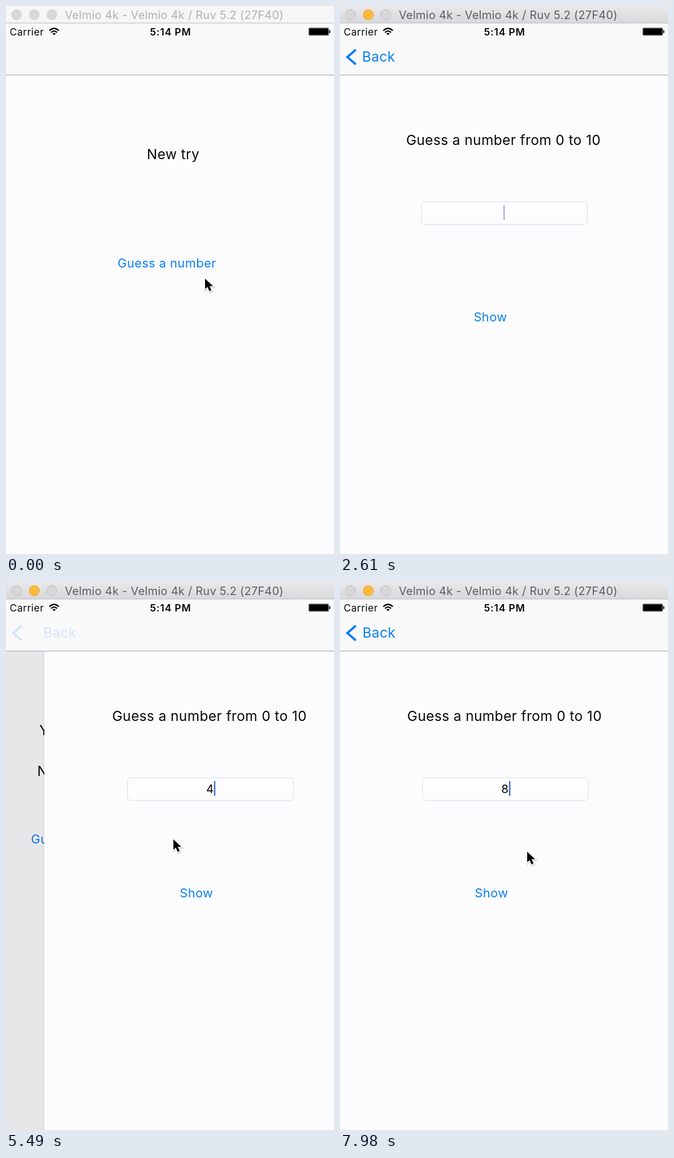
Recreate the animation shown at these times as an HTML page. Size 580x966 px, loop 8000 ms.

```html
<!DOCTYPE html>
<html lang="en">
<head>
<meta charset="utf-8">
<title>Guess a number</title>
<style>
  html, body { margin: 0; width: 100%; height: 100%; overflow: hidden; background: #fcfcfe; }
  svg { display: block; width: 580px; height: 966px; }
  text { font: 24.4px Inter, "Open Sans", sans-serif; letter-spacing: .42px; fill: #08080a; }
  .mid { text-anchor: middle; }
  .link { font-size: 21.8px; fill: #0b7ff0; }
  .status { font-size: 17.6px; }
  .clock { font-weight: 600; letter-spacing: .75px; }
  .title { font-size: 20px; letter-spacing: .25px; fill: #b2b1b4; }
  .light { fill: #d7d6d9; stroke: #d7d6d9; }
  .active .title { fill: #5e5d62; }
  .active .light { stroke: #bdbcc2; }
  .active .light.amber { fill: #fdb93a; stroke: #dfa136; }
</style>
</head>
<body>
<svg viewBox="0 0 580 966">
  <defs>
    <linearGradient id="chrome" x2="0" y2="1">
      <stop stop-color="#e9e8ea"/><stop offset="1" stop-color="#d8d7db"/>
    </linearGradient>
    <path id="arrow" d="M0 0v20l4.6-4.2 3.6 8 3.8-1.7-3.6-7.8h6.6z"/>
  </defs>
  <rect width="580" height="966" fill="#fcfcfe"/>

  <g id="home">
    <text class="mid" id="line1" x="295.5" y="270"></text>
    <text class="mid" id="line2" x="295.5" y="342"></text>
    <text class="mid link" x="284.5" y="461">Guess a number</text>
  </g>
  <rect id="dim" width="580" height="966"/>

  <g id="page">
    <rect x="-6" y="122" width="3" height="844" opacity=".03"/>
    <rect x="-3" y="122" width="590" height="844" fill="#fcfcfe"/>
    <text class="mid" x="289" y="245">Guess a number from 0 to 10</text>
    <rect x="144" y="345" width="293.5" height="40" rx="6" fill="#fdfdff" stroke="#d9d8e2"/>
    <text class="mid" id="digit" x="290" y="372" style="font-size:20.5px"></text>
    <rect id="caret" y="351" width="2.4" height="26" fill="#3f66d2"/>
    <text class="mid link" x="266" y="556">Show</text>
  </g>

  <rect y="30" width="580" height="91" fill="#f9f9fa"/>
  <rect y="121" width="580" height="1.3" fill="#b1b0ba"/>
  <g id="back">
    <path d="M28 77 13 90l15 13" fill="none" stroke="#0a7ff8" stroke-width="4"/>
    <text id="backLabel" y="98" style="fill:#0a7ff8">Back</text>
  </g>

  <text class="status" x="6.5" y="51.5">Carrier</text>
  <g fill="none" stroke="#08080a" stroke-width="2.3">
    <path d="M76.5 43.5q8.5-8 17 0M79.7 46.6q5.3-5 10.6 0"/>
    <path d="M82 48.4q3-2 6 0l-3 2.8z" fill="#08080a" stroke="none"/>
  </g>
  <text class="status clock mid" x="291" y="51.5">5:14 PM</text>
  <rect x="535.5" y="38.7" width="35" height="13" rx="2" stroke="#85858a" stroke-width="1.4"/>
  <rect x="571.4" y="42.5" width="2" height="5.5" rx="1"/>

  <g id="bar">
    <rect id="barFill" width="580" height="30"/>
    <rect y="29.4" width="580" height="1.2" fill="#bfbec9"/>
    <circle class="light" cx="18.5" cy="15.3" r="9"/>
    <circle class="light amber" cx="50" cy="15.3" r="9"/>
    <circle class="light" cx="81" cy="15.3" r="9"/>
    <text class="title" x="104" y="22.5">Velmio 4k - Velmio 4k / Ruv 5.2 (27F40)</text>
  </g>

  <g id="pointer">
    <g transform="translate(1 .5) scale(.93)">
      <use href="#arrow" x="1" y="2" fill="none" stroke="#000" stroke-width="3.5" opacity=".14"/>
      <use href="#arrow" stroke="#fff" stroke-width="2.6" paint-order="stroke" stroke-linejoin="round"/>
    </g>
  </g>
</svg>
<script>
const LOOP = 8000, SLIDE = 360, WIDTH = 580;
const $ = id => document.getElementById(id);

// [time, values...]: each row holds until the next
const slides = [[-SLIDE, 'pop'], [670, 'push'], [3600, 'pop'], [5370, 'push'], [6480, 'pop'], [7682, 'push']];
const results = [[0, 'New try', ''], [3600, 'You entered 4', 'Nope, too little'], [6480, 'You entered 8', 'Nope, too big']];
const digits = [[0, ''], [2800, '4'], [5900, ''], [6100, '8']];
const carets = [[0, false], [2010, true], [2800, true], [5370, true], [5900, true], [6100, true], [7682, true]];
const pointers = [[0, true], [2450, false], [3060, true], [5780, false], [6120, true]];
const active = [[0, false], [420, true]];

// [time, x, y]: eased between rows
const moves = [
  [0, 351, 480], [250, 351, 480], [560, 302, 453], [1250, 302, 453], [1750, 292, 366],
  [3060, 292, 366], [3420, 275, 556], [4600, 275, 556], [5100, 295, 453], [6120, 295, 453],
  [6360, 275, 553], [6700, 275, 553], [7300, 330, 475], [LOOP, 330, 475]
];

const clamp = v => Math.min(1, Math.max(0, v));
const smooth = p => p * p * (3 - 2 * p);
const at = (rows, t) => rows.findLast(row => row[0] <= t);

// cubic-bezier(.32, .72, 0, 1)
function glide(p) {
  let lo = 0, hi = 1, s = .5;
  for (let i = 0; i < 24; i++) {
    s = (lo + hi) / 2;
    if (.96 * s * (1 - s) ** 2 + s ** 3 < p) lo = s; else hi = s;
  }
  return 2.16 * s * (1 - s) ** 2 + 3 * s * s * (1 - s) + s ** 3;
}

function blink(ms) {
  const p = ms % 1000 / 1000;
  if (p < .5) return 1;
  return p < .8 ? clamp((.7 - p) / .2) : clamp((p - .85) / .15);
}

function pointerAt(t) {
  const i = Math.max(1, moves.findIndex(row => row[0] > t));
  const [t0, x0, y0] = moves[i - 1], [t1, x1, y1] = moves[i];
  const p = smooth(clamp((t - t0) / (t1 - t0)));
  return [x0 + (x1 - x0) * p, y0 + (y1 - y0) * p];
}

const shift = (id, x, y = 0) => $(id).setAttribute('transform', `translate(${x} ${y})`);

function draw(t) {
  const [start, kind] = at(slides, t);
  const push = kind === 'push';
  const p = clamp((t - start) / SLIDE);
  const shown = push ? glide(p) : 1 - glide(p);

  shift('page', (WIDTH + 7) * (1 - shown));
  shift('home', -.3 * WIDTH * shown);
  $('dim').setAttribute('opacity', .095 * shown);
  $('back').setAttribute('opacity', push ? clamp(p * 1.25) ** 2.2 : (1 - p) ** 6);
  $('backLabel').setAttribute('x', 39 + (push ? 223 : 190) * (1 - shown));

  const [, first, second] = at(results, t);
  $('line1').textContent = first;
  $('line2').textContent = second;

  const digit = at(digits, t)[1];
  $('digit').textContent = digit;
  const [since, focused] = at(carets, t);
  $('caret').setAttribute('x', digit ? 297 : 289);
  $('caret').setAttribute('opacity', focused ? blink(t - since) : 0);

  const isActive = at(active, t)[1];
  $('bar').classList.toggle('active', isActive);
  $('barFill').setAttribute('fill', isActive ? 'url(#chrome)' : '#f6f6f7');

  shift('pointer', ...pointerAt(t));
  $('pointer').setAttribute('opacity', at(pointers, t)[1] ? 1 : 0);
}

const begin = performance.now();
function tick() {
  draw((performance.now() - begin) % LOOP);
  requestAnimationFrame(tick);
}
tick();
</script>
</body>
</html>
```
